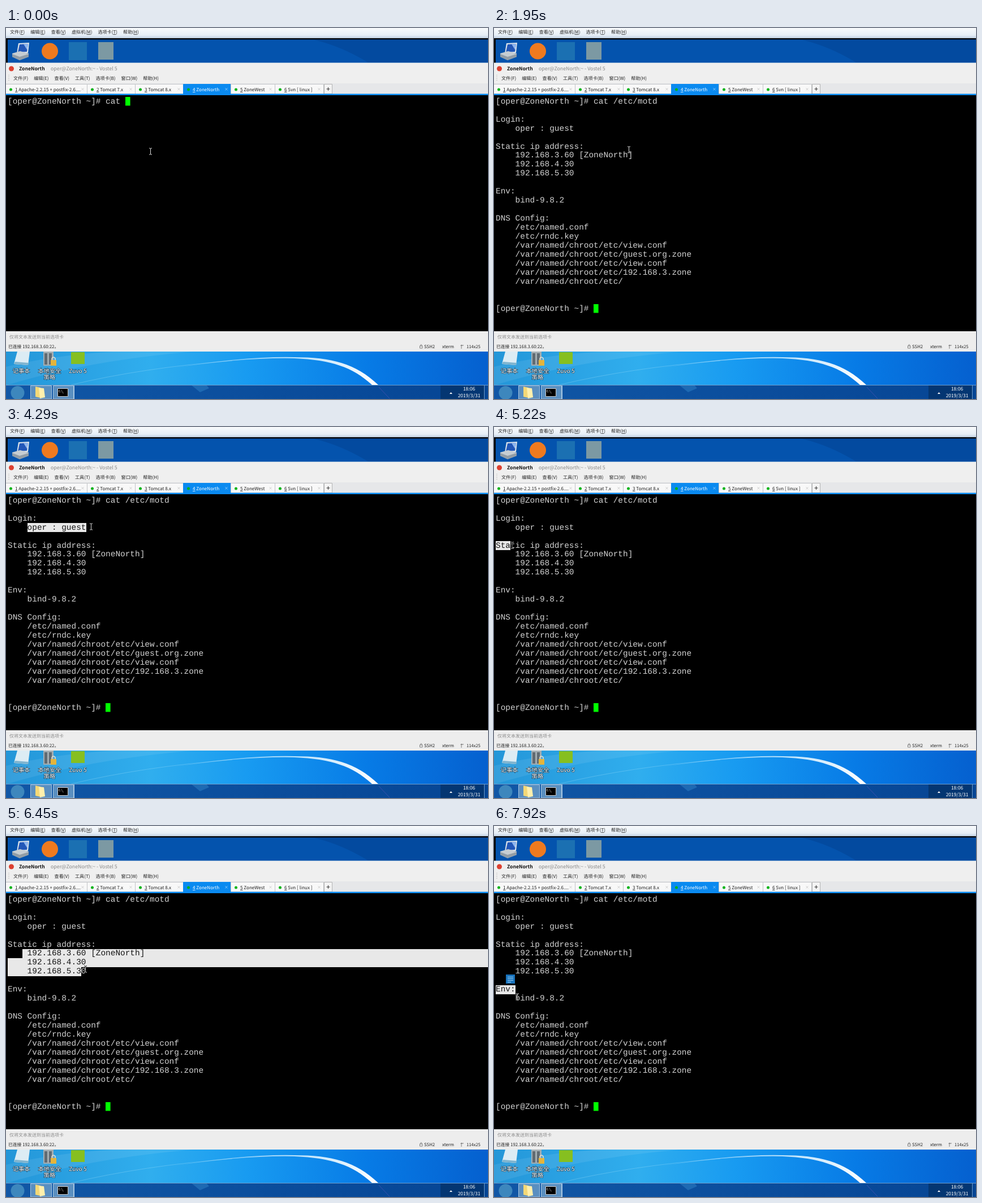
An HTML page that plays this animation: 852 by 657 pixels, repeating every 8 s.

```html
<!DOCTYPE html>
<html lang="zh">
<head>
<meta charset="utf-8">
<style>
html, body { margin: 0; width: 100%; height: 100%; overflow: hidden; background: #000; }
svg { display: block; width: 852px; height: 657px; isolation: isolate; }
text { white-space: pre; text-rendering: geometricPrecision; }
.ui { font-family: "Noto Sans CJK SC", "Noto Sans CJK", "Noto Sans", sans-serif; }
.term { font: 14.43px "Liberation Mono", monospace; fill: #d4d4d4; }
.invert { mix-blend-mode: difference; }
.icon { paint-order: stroke; stroke: #10344d; stroke-width: 1.2px; }
</style>
</head>
<body>
<svg viewBox="0 0 852 657" xmlns="http://www.w3.org/2000/svg">
  <defs>
    <linearGradient id="menu" x2="0" y2="1">
      <stop stop-color="#f8fafc"/><stop offset=".7" stop-color="#e6eef6"/><stop offset="1" stop-color="#c3d3e5"/>
    </linearGradient>
    <linearGradient id="sky">
      <stop stop-color="#2496d8"/><stop offset=".3" stop-color="#30aeee"/><stop offset=".5" stop-color="#189bf1"/>
      <stop offset=".75" stop-color="#077be6"/><stop offset="1" stop-color="#0560cf"/>
    </linearGradient>
    <linearGradient id="bar">
      <stop stop-color="#1157a6"/><stop offset="1" stop-color="#064594"/>
    </linearGradient>
    <linearGradient id="swoosh">
      <stop stop-color="#fff" stop-opacity=".1"/><stop offset=".6" stop-color="#e4f7ff" stop-opacity=".8"/><stop offset="1" stop-color="#fff"/>
    </linearGradient>
  </defs>

  <!-- host menu and upper desktop -->
  <path fill="url(#menu)" d="M0 0h852v18H0z"/>
  <path fill="#0453ad" d="M0 18h852v44H0z"/>
  <path fill="#034a9f" d="M545 21Q592 32 640 61H852V21z"/>
  <path fill="#05080c" d="M0 18h852v2.500H3V62H0z"/>
  <path fill="#dfe5ea" d="M22 27l19-1-2 18-20 1z"/>
  <path fill="#2257b8" d="M24 29l15-1-2 14-16 1z"/>
  <path fill="#8fb6ee" d="M31 28.500l8-.5-1.500 11z"/>
  <path fill="#c6cdd2" d="M11 45l14-4 15 4v6l-16 6-13-6z"/>
  <path fill="#929da6" d="M11 46l13 5 16-5v5l-16 6-13-6z"/>
  <circle cx="77.500" cy="41" r="14.500" fill="#ef7a1f"/>
  <path fill="#1b70b2" d="M111 25h32v32h-32z"/>
  <path fill="#7c99a3" d="M163 25h27v31h-27z"/>

  <!-- terminal window -->
  <path fill="#efefef" d="M0 61.500h852V119H0z"/>
  <path fill="#e6e7e9" d="M0 98h852v19H0z"/>
  <circle cx="9.500" cy="72" r="4.500" fill="#dc4030"/>
  <path stroke="#999" stroke-dasharray="1 2" d="M5 83v12"/>
  <g id="tabs" class="ui"></g>
  <path fill="#0a8af0" d="M0 116.500h852v2.500H0z"/>
  <path d="M0 119h852v418H0z"/>
  <path fill="#ededed" d="M0 537h852v36H0z"/>
  <path fill="none" stroke="#666" stroke-width=".8" d="M731.500 563h4.500v4h-4.500zM732.500 563v-1.500q1.300-2 2.600 0v1.500M805 568v-6h4M803.500 563l1.500-2 1.500 2"/>

  <!-- lower desktop -->
  <path fill="url(#sky)" d="M0 573h852v60H0z"/>
  <path fill="#fff" opacity=".08" d="M0 633Q140 590 330 573H190Q80 580 0 600z"/>
  <path fill="none" stroke="#c9f1ff" stroke-opacity=".25" d="M115 632Q240 602 400 589"/>
  <path fill="url(#swoosh)" d="M290 603Q420 581 510 583C575 583 618 594 658 632H647C612 600 575 588 510 585Q420 583 290 603z"/>
  <path fill="#dcecf4" d="M20 573h22l-3 24-25-2z"/>
  <path fill="#7fb4cf" d="M14 595l25 2 1-4-24-2z"/>
  <path fill="#a3adb2" d="M66 573h18v25H66z"/>
  <path fill="#616b72" d="M68 576h5v20h-5zM76 576h5v20h-5z"/>
  <path fill="#e5b43a" d="M79 588h10v10H79z"/>
  <path fill="none" stroke="#e0e0d5" stroke-width="1.500" d="M81 588v-3q3-4 6 0v3"/>
  <path fill="#86bf20" d="M115 574h24v21h-24z"/>

  <!-- taskbar -->
  <path fill="url(#bar)" d="M0 632h852v25H0z"/>
  <path fill="#2f83c8" opacity=".5" d="M327 632h27l5 6-16 7z"/>
  <path stroke="#3a4fae" d="M659 636l19 20"/>
  <path fill="#043672" d="M768 633h77v24h-77z"/>
  <path stroke="#6d9bc9" d="M0 632.500h852M845.500 633v24"/>
  <circle cx="20.500" cy="646" r="12" fill="#3d87bd"/>
  <path fill="#5a8fc0" stroke="#a8c7e2" d="M43.500 633.500h37V657h-37zM83.500 633.500h36V657h-36zM120.500 633v24"/>
  <path fill="#f4d877" d="M52 635l9 2v18l-9-2z"/>
  <path fill="#fff0ad" d="M58 637l9 1 2 16-9 2z"/>
  <path stroke="#ccc" d="M91.500 638.500h18v14h-18z"/>
  <path fill="#fff" d="M784 648l2.500-3 2.500 3z"/>
  <g id="labels" class="ui"></g>

  <!-- live part -->
  <g id="screen" class="term"></g>
  <path id="caret" fill="#0f0" d="M0 0h8.600v15.500h-8.600z"/>
  <path id="selection" class="invert" fill="#e8e8e8"/>
  <g id="popup">
    <path fill="#1873bd" d="M0 0h16v16H0z"/>
    <path stroke="#9fd0f2" d="M3 4.500h10M3 7.500h10M3 10.500h10M3 13.500h6"/>
  </g>
  <path id="mouse" class="invert" fill="none" stroke="#ddd" d="M-2.500-5.500h2l.5.500.5-.500h2M0-5V5M-2.500 5.500h2L0 5l.5.500h2"/>
</svg>
<script>
const $ = id => document.getElementById(id);
const CELL = 8.66, LINE = 15.96, LEFT = 3, TOP = 122, LOOP = 8000, TICK = 134;
const colX = c => Math.round(LEFT + c * CELL);
const rowY = r => Math.round(TOP + r * LINE);

// An underscore underlines the character after it.
const underline = s => s.replace(/_(.)/g, '<tspan text-decoration="underline">$1</tspan>');
const label = (s, x, y, size = 8.1, fill = '#222', extra = '') =>
  `<text x="${x}" y="${y}" font-size="${size}" fill="${fill}" ${extra}>${underline(s)}</text>`;

const titles = ['Apache-2.2.15 + postfix-2.6....', 'Tomcat 7.x', 'Tomcat 8.x', 'ZoneNorth', 'ZoneWest', 'Svn [ linux ]'];
const edges = [0, 144, 229, 314, 398, 476, 562];
$('tabs').innerHTML = titles.map((s, i) => {
  const a = edges[i], b = edges[i + 1], on = i == 3;
  return `<path fill="${on ? '#0a8af0' : '#f8f8f8'}" stroke="${on ? '#0a8af0' : '#c2c4c7'}" d="M${a - .5} 99.500H${b - .5}V117H${a - .5}z"/>` +
    `<circle cx="${a + 8.5}" cy="109" r="2.500" fill="#08b41a"/>` +
    label(`_${i + 1} ${s}`, a + 16, 112, 8.1, on ? '#fff' : '#222') +
    label('×', b - 12, 111, 7, on ? '#b8dcfa' : '#bbb');
}).join('') + '<path fill="#f4f4f4" stroke="#b4b4b4" d="M562.500 99.500h14v17h-14z"/><path stroke="#333" d="M566.500 108h6M569.500 105v6"/>';

const menu = (items, x, y) => label(items.split(' ').join('<tspan dx="10"></tspan>').replace(/<tspan dx="10"><\/tspan>(.)/g, '<tspan dx="10">$1</tspan>'), x, y);
const center = 'text-anchor="middle"';
const caption = (s, x, y) => label(s, x, y, 10.2, '#fff', center + ' class="icon"');
$('labels').innerHTML =
  menu('文件(_F) 编辑(_E) 查看(_V) 虚拟机(_M) 选项卡(_T) 帮助(_H)', 7, 10) +
  menu('文件(F) 编辑(E) 查看(V) 工具(T) 选项卡(B) 窗口(W) 帮助(H)', 13, 92) +
  label('ZoneNorth', 23, 75, 8.6, '#111', 'font-weight="bold"') +
  label('oper@ZoneNorth:~ - Vostel 5', 79, 75, 8.8, '#888') +
  label('仅将文本发送到当前选项卡', 6, 550, 8, '#8a8a8a') +
  label('已连接 192.168.3.60:22。', 4, 567, 7.8) +
  label('SSH2', 739, 567, 7.8) + label('xterm', 771, 567, 7.8) + label('114x25', 814, 567, 7.5) +
  caption('记事本', 27, 611) + caption('本地安全', 77, 611) + caption('策略', 77, 621.5) + caption('Zuvo 5', 127, 611) +
  label('18:06', 818.5, 642, 8.5, '#fff', center) + label('2019/3/31', 818.5, 654, 8.5, '#fff', center) +
  label('C:\\_.', 93, 645, 5.5, '#fff');

const prompt = '[oper@ZoneNorth ~]# ';
const motd = `
Login:
    oper : guest

Static ip address:
    192.168.3.60 [ZoneNorth]
    192.168.4.30
    192.168.5.30

Env:
    bind-9.8.2

DNS Config:
    /etc/named.conf
    /etc/rndc.key
    /var/named/chroot/etc/view.conf
    /var/named/chroot/etc/guest.org.zone
    /var/named/chroot/etc/view.conf
    /var/named/chroot/etc/192.168.3.zone
    /var/named/chroot/etc/


${prompt}`.split('\n');

// Mouse stops as time, x, y: the approach, then press and release of each drag, then the rest
const stops = [
  [1900, 255, 218], [2350, 4, 167],
  [2880, 4, 161], [3430, 50, 161],
  [3990, 41, 177], [4220, 150, 176],
  [5090, 5, 209], [5500, 160, 209],
  [6010, 31, 225], [6700, 160, 258],
  [7370, 6, 290], [7640, 39, 289],
  [7920, 41, 302]
];

// The mouse eases to each stop and waits there for the last 30% of the time.
function mouseAt(t) {
  const i = Math.max(0, stops.findLastIndex(s => s[0] <= t));
  const a = stops[i], b = stops[i + 1] || a;
  const f = Math.min(1, Math.max(0, (t - a[0]) / (b[0] - a[0] || 1) / .7));
  const e = f * f * (3 - 2 * f);
  return [a[1] + (b[1] - a[1]) * e, a[2] + (b[2] - a[2]) * e];
}

function cellAt(t) {
  const [x, y] = mouseAt(t);
  return [Math.floor((x - LEFT) / CELL), Math.floor((y - TOP) / LINE)];
}

function selectionPath([c0, r0], [c1, r1]) {
  let d = '';
  for (let r = r0; r <= r1; r++) {
    const a = colX(r == r0 ? c0 : 0), b = r == r1 ? colX(c1) : 852;
    if (b > a) d += `M${a} ${rowY(r)}H${b}V${rowY(r + 1)}H${a}z`;
  }
  return d;
}

const move = (id, x, y) => $(id).setAttribute('transform', `translate(${x} ${y})`);

let shown = '';
function showLines(lines) {
  const key = lines.join('\n');
  if (key == shown) return;
  shown = key;
  $('screen').innerHTML = lines.map((s, r) => `<text x="${LEFT}" y="${TOP + 11.7 + r * LINE}">${s}</text>`).join('');
  const row = lines.length - 1;
  move('caret', colX(lines[row].length), rowY(row));
}

function showSelection(t) {
  let i = stops.findLastIndex((s, n) => n > 1 && n % 2 == 0 && n < stops.length - 1 && s[0] <= t);
  $('popup').style.display = 'none';
  if (i < 0) return $('selection').setAttribute('d', '');
  const press = stops[i][0], release = stops[i + 1][0];
  const [col, row] = cellAt(Math.min(t, release));
  $('selection').setAttribute('d', selectionPath(cellAt(press), [col, row]));
  if (t < release + 180) return;
  $('popup').style.display = '';
  // Long selections get the button below their end, short ones above it.
  if (col > 16) move('popup', colX(col) - 1, rowY(row + 1) + 8);
  else move('popup', colX(col) - 17, rowY(row) - 19);
}

function draw(now) {
  const time = now % LOOP, t = Math.floor(time / TICK - 14.55) * TICK + 1950;
  const typed = Math.round(Math.min(6, Math.floor((time + 24) / 144)) / 6 * 10);
  const command = prompt + 'cat ' + '/etc/motd '.slice(0, typed);
  showLines(time < 1210 ? [command] : [command, ...motd]);
  move('mouse', ...mouseAt(t).map(v => Math.round(v) + .5));
  showSelection(t);
}

const begin = performance.now();
function tick() {
  draw(performance.now() - begin);
  requestAnimationFrame(tick);
}
tick();
</script>
</body>
</html>
```
